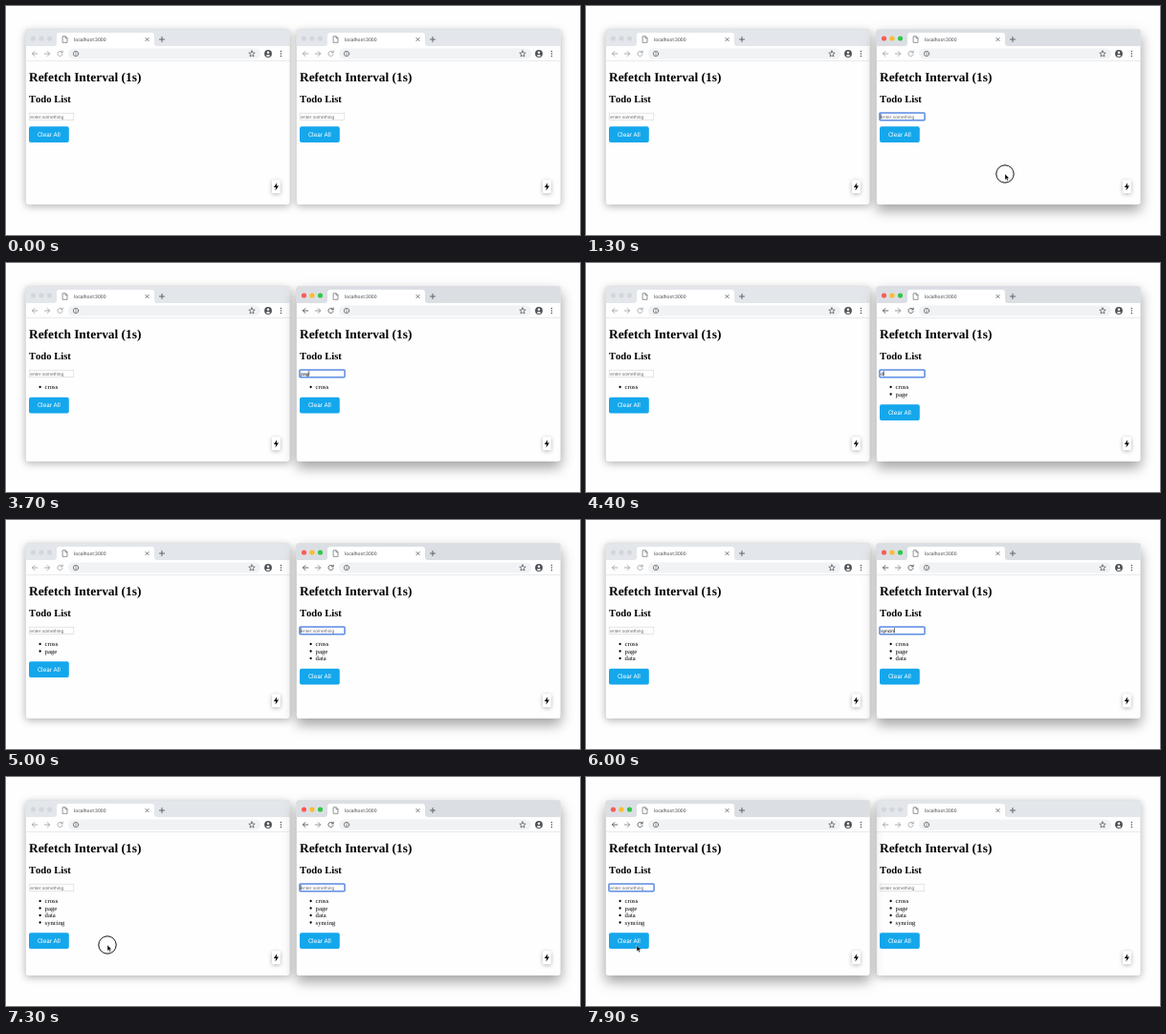
Recreate the animation shown at these times as an HTML page. Size 600 by 240 pixels, loop 8 s.

```html
<!DOCTYPE html>
<html lang="en">
<head>
<meta charset="utf-8">
<title>Refetch Interval</title>
<style>
html, body { margin: 0; width: 100%; height: 100%; overflow: hidden; background: #fefefe; }
svg { display: block; width: 600px; height: 240px; }
text { font-family: Roboto, "Liberation Sans", sans-serif; font-kerning: none; text-rendering: geometricPrecision; }
.serif { font-family: "Liberation Serif", "Times New Roman", serif; fill: #000; }
.field { font-family: "Liberation Sans", Arial, sans-serif; font-size: 4.9px; }
.line { fill: none; stroke-linecap: round; stroke-linejoin: round; }
.frame { fill: #fefefe; filter: drop-shadow(0 2.5px 4px rgba(0,0,0,.24)) drop-shadow(0 0 .5px rgba(0,0,0,.3)); }
.strip { fill: #e3e6ea; }
.light { fill: #d3d6da; }
.nav { stroke: #9b9fa4; }
.ring, .caret { visibility: hidden; }
.active .frame { filter: drop-shadow(0 6px 7px rgba(0,0,0,.3)) drop-shadow(0 0 .5px rgba(0,0,0,.35)); }
.active .strip { fill: #dbdfe4; }
.active .light:nth-of-type(1) { fill: #fc5b57; }
.active .light:nth-of-type(2) { fill: #f8bd32; }
.active .light:nth-of-type(3) { fill: #34c648; }
.active .ring { visibility: visible; }
.ready .nav { stroke: #4a4e53; }
.ready .forward { stroke: #85898e; }
.blink .caret { visibility: visible; }
.badge { fill: #fff; filter: drop-shadow(0 1px 2px rgba(0,0,0,.3)); }
</style>
</head>
<body>
<svg id="stage" viewBox="0 0 600 240" xmlns="http://www.w3.org/2000/svg">
  <g id="pointer">
    <circle id="press" r="9.2" fill="rgba(255,255,255,.6)" stroke="#111" stroke-width="1"/>
    <path d="M0 0V6.2L1.5 4.9L2.5 7.2L3.6 6.7L2.6 4.5H4.5Z" fill="#000" stroke="#fff" stroke-width=".4"/>
  </g>
</svg>
<script>
const LOOP = 8000, STEP = 100;
const NS = "http://www.w3.org/2000/svg";
const stage = document.getElementById("stage");
const pointer = document.getElementById("pointer");
const press = document.getElementById("press");
const words = ["cross", "page", "data", "syncing"];

// Each row: start time, value
const typed = [
  [0, ""],
  [2700, "c"], [2800, "cr"], [2900, "cro"], [3000, "cros"], [3100, "cross"], [3200, ""],
  [3500, "p"], [3600, "pa"], [3700, "pag"], [3800, "page"], [3900, ""],
  [4400, "d"], [4500, "da"], [4700, "dat"], [4800, "data"], [4900, ""],
  [5500, "s"], [5600, "sy"], [5700, "syn"], [5800, "sync"],
  [6000, "syncin"], [6100, "syncing"], [6300, ""]
];
const counts = {
  left: [[0, 0], [3500, 1], [4500, 2], [5300, 3], [6700, 4]],
  right: [[0, 0], [3300, 1], [4000, 2], [5000, 3], [6400, 4]]
};
const focus = [[0, ""], [1200, "right"], [7400, "left"]];
const caret = [
  [0, false], [1200, true], [1600, false], [2000, true], [2400, false],
  [2700, true], [5300, false], [5500, true], [6700, false], [7200, true], [7700, false]
];
const path = [
  [0, null], [1000, [396, 150]], [1100, [426, 170]], [1200, [438, 176]], [2700, null],
  [6900, [404, 176]], [7000, [300, 176]], [7100, [180, 176]], [7200, [118, 176]],
  [7300, [106, 176]], [7700, [88, 177]], [7800, [64, 177]], [7900, [53, 176.5]]
];

const at = (rows, t) => rows.reduce((v, row) => t >= row[0] ? row[1] : v, rows[0][1]);
const within = (t, a, b) => t >= a && t < b;

function makeWindow(x) {
  const g = document.createElementNS(NS, "g");
  g.setAttribute("transform", `translate(${x} 0)`);
  g.innerHTML = `
    <rect class="frame" x="20.5" y="24.5" width="276.3" height="183.5" rx="2.5"/>
    <path class="strip" d="M20.5 42V27.5q0-3 3-3h270.3q3 0 3 3V42z"/>
    <g>${[28.5, 37, 45.5].map(cx => `<circle class="light" cx="${cx}" cy="34" r="2.6"/>`).join("")}</g>
    <path d="M50 42q3 0 3-3V31q0-3 3-3h96q3 0 3 3v8q0 3 3 3z" fill="#fff"/>
    <path class="line" d="M59.5 31.8h2.8l1.7 1.8v4.7h-4.5zM62.1 32v1.8h1.8" stroke="#65696e" stroke-width=".7"/>
    <text x="71" y="37" font-size="5.1" fill="#484b50">localhost:3000</text>
    <path class="line" d="M145.9 33.4l3.3 3.3m0-3.3l-3.3 3.3" stroke="#55595e" stroke-width=".8"/>
    <path class="line" d="M160.4 35h5.2m-2.6-2.6v5.2" stroke="#55595e" stroke-width=".9"/>
    <rect x="65" y="44.5" width="201" height="11" rx="5.5" fill="#f0f2f4"/>
    <path d="M20.5 57.5h276.3" stroke="#e0e2e5" stroke-width=".7"/>
    <g class="line" stroke-width=".85">
      <path class="nav" d="M32.8 50h-5.4m2.5-2.5L27.4 50l2.5 2.5"/>
      <path class="nav forward" d="M40.3 50h5.4m-2.5-2.5l2.5 2.5l-2.5 2.5"/>
      <path class="nav" d="M58.7 48.4A2.6 2.6 0 1 0 59.1 50.7M59.2 47v1.9h-1.9"/>
      <circle cx="73" cy="50" r="2.7" stroke="#606469" stroke-width=".75"/>
      <path d="M73 49.8v1.5M73 48.5v.1" stroke="#606469" stroke-width=".75"/>
      <path d="M257 46.9l.9 2.1l2.3.2l-1.8 1.5l.6 2.3l-2-1.2l-2 1.2l.6-2.3l-1.8-1.5l2.3-.2z" stroke="#4b4f54" stroke-width=".7"/>
    </g>
    <circle cx="274" cy="50" r="3.9" fill="#4b4f54"/>
    <circle cx="274" cy="48.7" r="1.3" fill="#fff"/>
    <path d="M271.6 52.1q2.4-2.2 4.8 0q-2.4 2.1-4.8 0z" fill="#fff"/>
    <g fill="#4b4f54">${[47.6, 50, 52.4].map(cy => `<circle cx="287.4" cy="${cy}" r=".75"/>`).join("")}</g>
    <text class="serif" x="24" y="79" font-size="13.38" font-weight="700">Refetch Interval (1s)</text>
    <text class="serif" x="24" y="101" font-size="10.6" font-weight="700">Todo List</text>
    <rect x="24.2" y="112.2" width="46.6" height="7.2" fill="#fff" stroke="#d2d2d2" stroke-width=".6"/>
    <rect class="ring" x="23.9" y="111.9" width="47.2" height="7.8" rx=".9" fill="none" stroke="#5d8ee6" stroke-width="1.5"/>
    <text class="field value" x="25.2" y="117.5"></text>
    <path class="caret" d="M0 113.2v5.2" stroke="#000" stroke-width=".6"/>
    ${words.map((w, i) => `<g class="item">
      <circle cx="35.6" cy="${130 + i * 7.5}" r="1.15"/>
      <text class="serif" x="40.6" y="${132.1 + i * 7.5}" font-size="6.67">${w}</text></g>`).join("")}
    <g class="button">
      <rect x="24" width="41.8" height="16.8" rx="2" fill="#14a7ec"/>
      <text x="32.9" y="10.7" font-size="6.5" fill="#fff">Clear All</text>
    </g>
    <rect class="badge" x="278" y="182.3" width="8.8" height="14" rx="1.5"/>
    <path d="M283.2 185.2l-3.3 4.7h2.2l-.6 3.7l3.5-5h-2.3z"/>`;
  stage.insertBefore(g, pointer);
  const find = s => g.querySelector(s);
  return {
    g, value: find(".value"), caret: find(".caret"), button: find(".button"),
    items: [...g.querySelectorAll(".item")]
  };
}

const wins = { left: makeWindow(0), right: makeWindow(283) };
let front = null;

function drawWindow(name, t) {
  const w = wins[name];
  const active = at(focus, t) === name;
  const ready = active && t >= (name === "right" ? 2700 : 7700);
  const text = name === "right" ? at(typed, t) : "";
  const n = at(counts[name], t);
  w.g.classList.toggle("active", active);
  w.g.classList.toggle("ready", ready);
  w.g.classList.toggle("blink", active && at(caret, t));
  w.value.textContent = text || "enter something";
  w.value.setAttribute("fill", text ? "#000" : "#6f6f6f");
  const end = text ? w.value.getComputedTextLength() + .3 : 0;
  w.caret.setAttribute("transform", `translate(${25.2 + end} 0)`);
  w.items.forEach((el, i) => el.style.display = i < n ? "" : "none");
  const y = n ? 133.2 + n * 7.5 : 126.3;
  w.button.setAttribute("transform", `translate(0 ${y})`);
}

function draw(time) {
  const t = Math.floor(time % LOOP / STEP) * STEP;
  const top = at(focus, t) || "right";
  if (top !== front) {
    stage.insertBefore(wins[top].g, pointer);
    front = top;
  }
  drawWindow("left", t);
  drawWindow("right", t);
  const p = at(path, t);
  pointer.style.display = p ? "" : "none";
  if (p) pointer.setAttribute("transform", `translate(${p})`);
  press.style.display = within(t, 1200, 1500) || within(t, 7200, 7400) ? "" : "none";
}

const start = performance.now();
function tick() {
  draw(performance.now() - start);
  requestAnimationFrame(tick);
}
tick();
</script>
</body>
</html>
```
